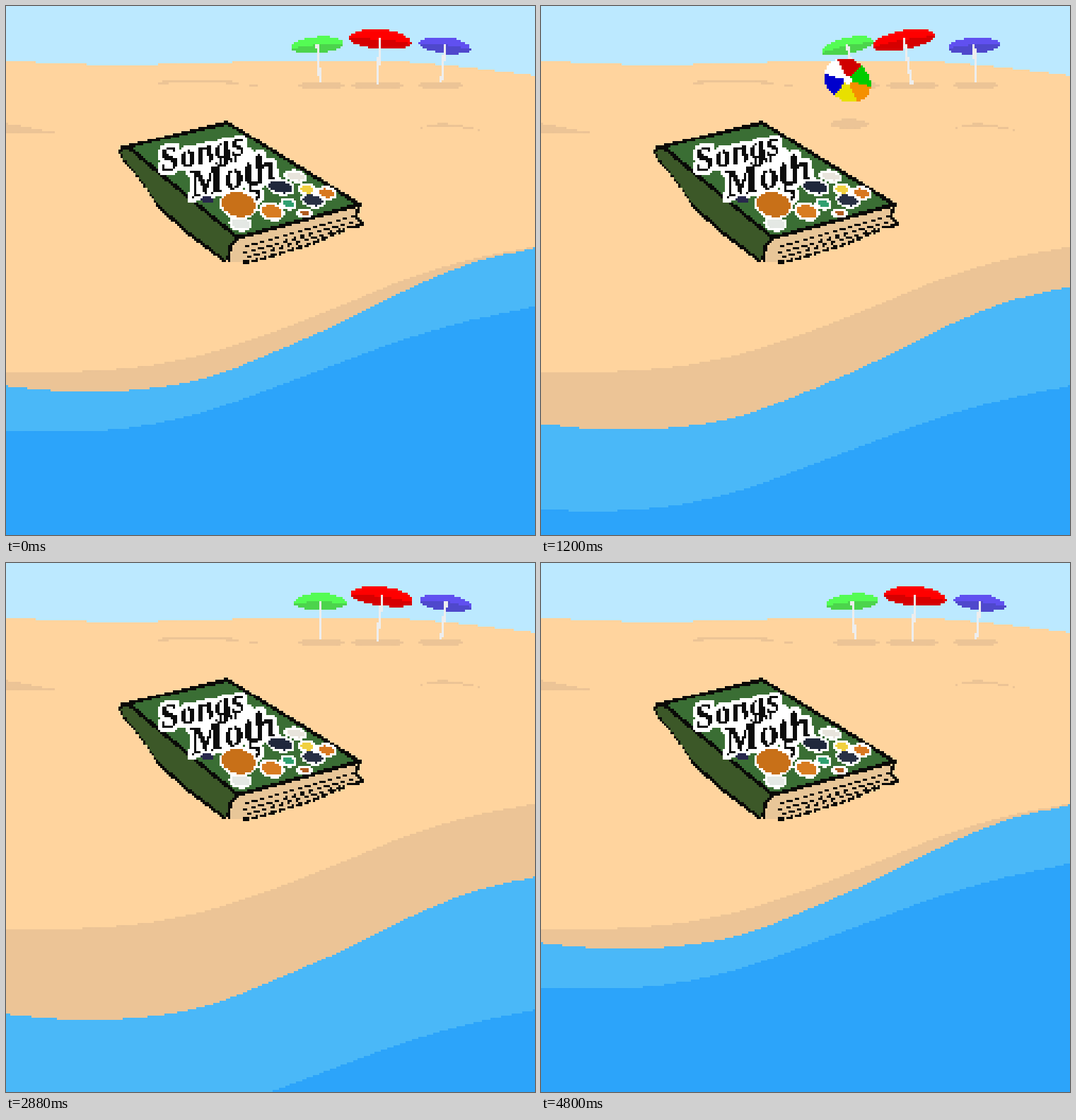
An HTML page with a canvas for the animation above (4.88 s loop, 748 by 748 pixels).

```html
<!DOCTYPE html>
<html lang="en">
<head>
<meta charset="utf-8">
<title>Beach book</title>
<style>
  html, body { margin: 0; width: 100%; height: 100%; overflow: hidden; background: #ffd49e; }
  canvas { display: block; width: 100%; height: 100%; image-rendering: pixelated; }
</style>
</head>
<body>
<canvas id="stage" width="250" height="250"></canvas>
<script>
const STAGE = 748, GRID = 250;
const STEP_MS = 80, STEPS = 61;
const DAMP = '#ecc496';

const makeContext = () => {
  const c = document.createElement('canvas');
  c.width = c.height = GRID;
  return c.getContext('2d', { willReadFrequently: true });
};
const screen = document.getElementById('stage').getContext('2d');
const backdrop = makeContext();
const pen = makeContext();

// Draws one flat colour in stage units and hardens its edges to whole pixels.
function paint(target, color, draw) {
  pen.clearRect(0, 0, GRID, GRID);
  pen.save();
  pen.scale(GRID / STAGE, GRID / STAGE);
  pen.fillStyle = pen.strokeStyle = color;
  pen.lineJoin = 'round';
  pen.beginPath();
  draw(pen);
  pen.restore();
  const image = pen.getImageData(0, 0, GRID, GRID);
  for (let i = 3; i < image.data.length; i += 4) image.data[i] = image.data[i] > 127 ? 255 : 0;
  pen.putImageData(image, 0, 0);
  target.drawImage(pen.canvas, 0, 0);
}

function trace(p, points) {
  for (let i = 0; i < points.length; i += 2) p.lineTo(points[i], points[i + 1]);
}
const polygon = (g, color, ...points) => paint(g, color, p => { trace(p, points); p.fill(); });
const line = (g, color, width, dash, ...points) => paint(g, color, p => {
  trace(p, points);
  p.lineWidth = width;
  p.setLineDash(dash);
  p.stroke();
});
const ellipse = (g, color, x, y, rx, ry, turn = 0) => paint(g, color, p => {
  p.ellipse(x, y, rx, ry, turn, 0, 7);
  p.fill();
});

// Smooth curve through evenly spaced heights.
function heightAt(ys, x) {
  const pos = x / STAGE * (ys.length - 1);
  const i = Math.min(Math.floor(pos), ys.length - 2), t = pos - i;
  const b = ys[i], c = ys[i + 1];
  const a = ys[i - 1] ?? 2 * b - c, d = ys[i + 2] ?? 2 * c - b;
  return b + t / 2 * (c - a + t * (2 * a - 5 * b + 4 * c - d + t * (3 * (b - c) + d - a)));
}
function ground(g, color, ys, drop = 0) {
  paint(g, color, p => {
    p.moveTo(0, STAGE + 2);
    for (let x = 0; x <= STAGE; x += 4) p.lineTo(x, heightAt(ys, x) + drop);
    p.lineTo(STAGE, STAGE + 2);
    p.fill();
  });
}

const HORIZON = [77, 82, 83, 81, 78, 78, 79, 87, 98];
const DAMP_EDGE = [517, 517, 510, 492, 462, 426, 388, 359, 340];
const SHALLOW = [537, 545, 542, 526, 491, 450, 404, 365, 342];
const DEEP = [601, 603, 595, 574, 541, 506, 472, 445, 425];

const umbrellas = [
  { x: 444, y: 107, pole: 53, rim: 50, rx: 37, top: 14, low: 9, light: '#54fc54', dark: '#4cd44c', lean: -4.5, sway: 8, peak: 45 },
  { x: 524, y: 110, pole: 65, rim: 61, rx: 45, top: 16, low: 11, light: '#ff0000', dark: '#d60000', lean: 2, sway: 12.5, peak: 47 },
  { x: 616, y: 107, pole: 53, rim: 50, rx: 37, top: 13, low: 10, light: '#6050f0', dark: '#4f48cc', lean: 4, sway: 8, peak: 47 }
];

const title = [
  ['Songs', 281, 222, 48], ['of a', 313, 224, 20], ['Moth', 324, 258, 56], ['5', 354, 275, 38]
];
const stickers = [
  [285, 274, 9, 5, '#28284c'], [329, 281, 24, 17, '#c87018'], [332, 308, 13, 7, '#e4e8e4'],
  [376, 291, 15, 9, '#d87c20'], [388, 256, 17, 8, '#20283c'], [409, 241, 13, 5, '#e8e4dc'],
  [426, 260, 9, 5, '#f0d040'], [434, 275, 14, 7, '#283044'], [453, 265, 11, 6, '#d87820'],
  [399, 280, 8, 5, '#30a070'], [422, 293, 8, 3, '#b05c20']
];

function drawTitle(g) {
  const write = (color, outline) => {
    for (const [text, x, y, size] of title) {
      paint(g, color, p => {
        p.translate(x, y);
        p.rotate(-0.22);
        p.font = `italic bold ${size}px "Liberation Serif", serif`;
        p.textAlign = 'center';
        p.lineWidth = outline;
        if (outline) p.strokeText(text, 0, 0);
        p.fillText(text, 0, 0);
      });
    }
  };
  polygon(g, '#fff', 240, 212, 330, 192, 362, 212, 366, 240, 286, 250, 262, 232);
  write('#fff', 13);
  write('#0c0c0c', 0);
}

function drawBook(g) {
  const ink = '#0a0a08';
  polygon(g, '#e8c698', 326, 330, 499, 285, 494, 300, 502, 311, 480, 315, 430, 337, 345, 363, 314, 363);
  polygon(g, '#3c5828', 160, 208, 172, 199, 328, 328, 316, 340, 313, 361, 250, 315, 213, 280, 195, 252, 172, 226);
  polygon(g, '#3a6e34', 172, 199, 313, 164, 500, 281, 328, 328);
  line(g, ink, 4.5, [], 312, 362, 250, 315, 213, 280);
  line(g, ink, 3, [6, 3], 213, 280, 195, 252, 172, 226, 160, 209);
  line(g, ink, 5, [], 159, 210, 164, 201, 172, 199, 313, 165, 500, 281, 328, 328, 172, 199);
  line(g, ink, 5, [], 328, 328, 317, 340, 314, 361);
  line(g, ink, 4, [], 499, 282, 494, 299, 505, 310, 480, 314);
  line(g, ink, 3.5, [7, 4], 338, 340, 494, 297);
  line(g, ink, 3.5, [8, 4], 334, 350, 490, 306);
  line(g, ink, 3.5, [7, 5], 340, 356, 478, 315);
  line(g, ink, 4, [10, 3], 334, 362, 350, 361, 430, 337, 480, 316);
  drawTitle(g);
  for (const [x, y, rx, ry] of stickers.slice(1)) ellipse(g, '#fff', x, y, rx + 4, ry + 4, 0.2);
  for (const [x, y, rx, ry, color] of stickers) ellipse(g, color, x, y, rx, ry, 0.2);
}

function drawBackdrop(g) {
  g.fillStyle = '#bce9ff';
  g.fillRect(0, 0, GRID, GRID);
  ground(g, '#ffd49e', HORIZON);
  ground(g, DAMP, DAMP_EDGE);
  polygon(g, DAMP, 0, 165, 40, 173, 84, 181, 30, 180, 0, 178);
  line(g, DAMP, 3.5, [], 215, 109, 245, 106, 290, 106, 330, 109);
  line(g, DAMP, 3, [], 344, 112, 356, 112);
  line(g, DAMP, 3, [], 596, 169, 620, 167, 640, 170, 660, 172);
  line(g, DAMP, 3, [], 586, 172, 590, 172);
  line(g, DAMP, 3, [], 667, 175, 671, 175);
  ellipse(g, DAMP, 446, 112, 33, 6);
  ellipse(g, DAMP, 525, 112, 37, 6);
  ellipse(g, DAMP, 615, 112, 32, 6);
  drawBook(g);
}

function drawUmbrella(u, step) {
  const degrees = u.lean + u.sway * Math.cos((step - u.peak) * Math.PI / 30);
  const part = (color, draw) => paint(screen, color, p => {
    p.translate(u.x, u.y);
    p.rotate(degrees * Math.PI / 180);
    draw(p);
  });
  part(u.dark, p => { p.ellipse(0, -u.rim, u.rx, u.low, 0, 0, 7); p.fill(); });
  part(u.light, p => {
    p.ellipse(0, -u.rim, u.rx, u.top, 0, Math.PI, 2 * Math.PI);
    p.quadraticCurveTo(0, -u.rim - 5, -u.rx, -u.rim);
    p.fill();
  });
  part('#eeeeee', p => {
    p.lineWidth = 4;
    p.moveTo(0, 0);
    p.lineTo(0, -u.pole);
    p.stroke();
  });
}

const wedges = ['#f59000', '#e8e000', '#0000cc', '#ffffff', '#d00000', '#00cc00'];

function drawBall(step) {
  const since = step - 10;
  const x = 236 + 39.4 * since;
  if (x < -45 || x > STAGE + 45) return;
  const floor = 128 + 7.7 * since;
  const phase = (since / 10.8 + 2) % 1;
  const y = floor - 34 - 28 * 4 * phase * (1 - phase);
  const rad = Math.PI / 180;
  const part = (color, draw) => paint(screen, color, p => {
    p.translate(x, y);
    p.rotate((22.2 * since - 75) * rad);
    p.scale(35, 28.5);
    draw(p);
    p.fill();
  });
  ellipse(screen, DAMP, x + 3, floor, 27, 7);
  part('#ffffff', p => p.arc(0, 0, 0.97, 0, 7));
  wedges.forEach((color, i) => part(color, p => {
    p.moveTo(0, 0);
    p.arc(0, 0, 1, (i * 60 - 25) * rad, (i * 60 + 36) * rad);
  }));
  part('#ffffff', p => p.arc(0, 0, 0.2, 0, 7));
}

// The tide eases out, rests for one step and eases back.
function tideAt(step) {
  const turn = step <= 30 ? step / 30 : step < 31 ? 1 : 1 + (step - 31) / 29;
  return (1 - Math.cos(Math.PI * turn)) / 2;
}

function drawScene(step) {
  screen.drawImage(backdrop.canvas, 0, 0);
  const tide = tideAt(step);
  ground(screen, '#4ab8f8', SHALLOW, 109 * tide);
  ground(screen, '#2ca4fa', DEEP, 223 * tide);
  for (const u of umbrellas) drawUmbrella(u, step);
  drawBall(step);
}

drawBackdrop(backdrop);
const start = performance.now();
let shown = -1;
function tick() {
  const step = Math.floor((performance.now() - start) / STEP_MS) % STEPS;
  if (step !== shown) drawScene(shown = step);
  requestAnimationFrame(tick);
}
tick();
</script>
</body>
</html>
```
